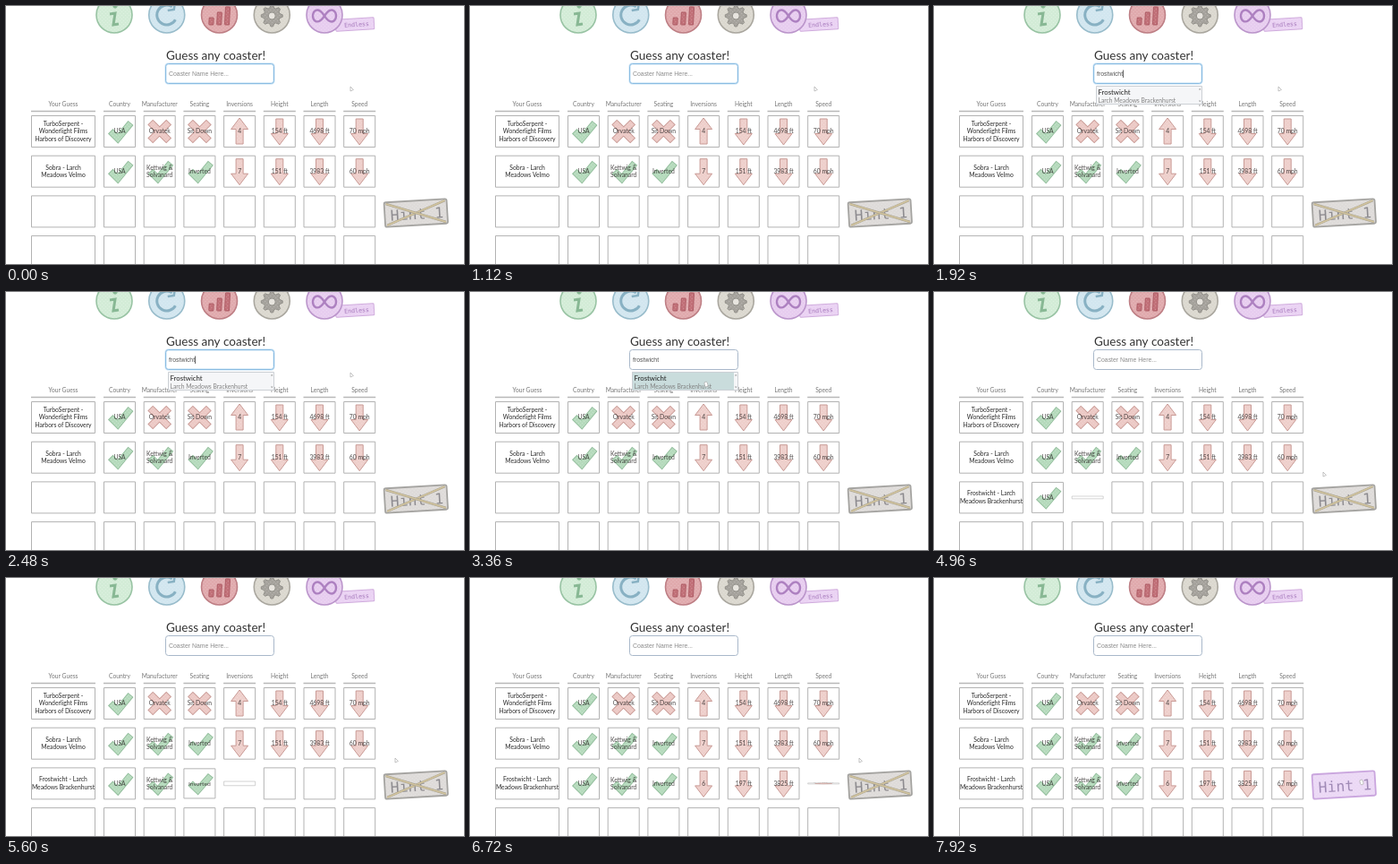
Recreate the animation shown at these times as an HTML page with a canvas. Size 512 px wide and 288 px high, loop 8000 ms.

```html
<!DOCTYPE html>
<html lang="en">
<head>
<meta charset="utf-8">
<title>Coaster guessing game</title>
<style>
html, body { margin: 0; width: 512px; height: 288px; overflow: hidden; background: #fff; }
canvas { display: block; }
</style>
</head>
<body>
<canvas id="stage" width="512" height="288"></canvas>
<script>
const g = document.getElementById('stage').getContext('2d');
const LOOP = 8000, PITCH = 44.7, CELL = 36;
const SANS = 'Lato, "Open Sans", sans-serif';
const ARIAL = '"Liberation Sans", Arial, sans-serif';
const HAND = '"DejaVu Sans Mono", monospace';
const HEADS = ['Your Guess', 'Country', 'Manufacturer', 'Seating', 'Inversions', 'Height', 'Length', 'Speed'];
const ROWS = [
  { text: ['TurboSerpent -|Wonderlight Films|Harbors of Discovery', 'USA', 'Orvatek', 'Sit Down', '4', '154 ft', '4698 ft', '70 mph'], marks: ' vxxuddd' },
  { text: ['Sobra - Larch|Meadows Velmo', 'USA', 'Kettwig &|Solvanard', 'Inverted', '7', '151 ft', '3983 ft', '60 mph'], marks: ' vvvdddd' },
  { text: ['Frostwicht - Larch|Meadows Brackenhurst', 'USA', 'Kettwig &|Solvanard', 'Inverted', '6', '197 ft', '3825 ft', '67 mph'], marks: ' vvvdddd' }
];
const QUERY = 'frostwicht';
const TYPE_AT = 1360, TYPE_STEP = 55, HOVER = 2900, PRESS = 3280, PICK = 3500;
const FLIP_MID = 4386, FLIP_GAP = 333, FLIP_HALF = 400, HINT_AT = 7200;

// Light speckle laid over the hand-drawn shapes
const tile = document.createElement('canvas');
tile.width = tile.height = 4;
const tg = tile.getContext('2d');
tg.fillStyle = 'rgba(255,255,255,.25)';
tg.fillRect(0, 0, 1, 1);
tg.fillRect(2, 2, 1, 1);
const speckle = g.createPattern(tile, 'repeat');

const clamp = v => Math.max(0, Math.min(1, v));
const easeOut = p => 1 - (1 - p) ** 2;
const glide = (t, from, to) => {
  const u = clamp((t - from) / (to - from));
  return u * u * (3 - 2 * u);
};

function at(x, y, turn, body) {
  g.save();
  g.translate(x, y);
  g.rotate(turn);
  body();
  g.restore();
}

function text(str, x, y, size, color, align = 'left', family = SANS) {
  g.font = `${size}px ${family}`;
  g.fillStyle = color;
  g.textAlign = align;
  g.fillText(str, x, y);
}

function trace(...pts) {
  const p = new Path2D();
  pts.forEach(q => p.lineTo(...q));
  return p;
}

function disc(x, y, r, from = 0, to = 7) {
  const p = new Path2D();
  p.arc(x, y, r, from, to);
  return p;
}

function box(w, h, r = 0) {
  const p = new Path2D();
  p.roundRect(-w / 2, -h / 2, w, h, r);
  return p;
}

function line(path, color, width) {
  g.strokeStyle = color;
  g.lineWidth = width;
  g.stroke(path);
}

function paint(path, fill, edge, width = 1) {
  for (const style of [fill, speckle]) {
    g.fillStyle = style;
    g.fill(path);
  }
  line(path, edge, width);
}

// Thick outlined pen stroke
function marker(path, width, fill, edge) {
  g.lineCap = 'square';
  line(path, edge, width + 1.8);
  line(path, fill, width);
  line(path, speckle, width);
  g.lineCap = 'butt';
}

const CHECK = trace([-7.5, 2.5], [-2, 8], [10, -6.5]);
const CROSS = trace([-7.5, -7.5], [7.5, 7.5]);
CROSS.addPath(trace([-7.5, 7.5], [7.5, -7.5]));
const half = [[4, -14], [4, 2.5], [9.5, 2.5], [0, 15]];
const ARROW = trace(...half, ...half.map(([x, y]) => [-x, y]).reverse());
ARROW.closePath();

function drawMark(kind) {
  if (kind === 'v') marker(CHECK, 6, '#b5dabc', '#92bd9c');
  if (kind === 'x') marker(CROSS, 6.5, '#ecc9c5', '#c99a95');
  if (kind === 'd') paint(ARROW, '#eecfcb', '#c99a95');
  if (kind === 'u') at(0, 0, Math.PI, () => paint(ARROW, '#eecfcb', '#c99a95'));
}

const column = i => i ? { x: 109 + PITCH * (i - 1), w: CELL } : { x: 28, w: 72 };

function drawCell(row, i, t) {
  const { x, w } = column(i);
  let filled = row < 2, scale = 1;
  if (row === 2) {
    const phase = (t - FLIP_MID - FLIP_GAP * i) / FLIP_HALF;
    filled = phase >= 0;
    const turn = easeOut(clamp(filled ? phase : phase + 1)) * Math.PI / 2;
    scale = Math.max(.01, filled ? Math.sin(turn) : Math.cos(turn));
  }
  at(x + w / 2, 140 + PITCH * row, 0, () => {
    g.scale(1, scale);
    line(box(w - 1, CELL - 1), '#b2b2b2', 1);
    if (!filled) return;
    drawMark(ROWS[row].marks[i]);
    const lines = ROWS[row].text[i].split('|'), gap = i ? 8 : 8.7;
    lines.forEach((s, n) => text(s, 0, 2.4 + gap * (n - (lines.length - 1) / 2), 6.8,
      i ? 'rgba(35,30,30,.8)' : '#2a2a2a', 'center'));
  });
}

const GLYPHS = [
  c => {
    paint(disc(1, -10, 2.2), c, c);
    line(trace([-5, -1], [1, -2], [-1, 11], [5, 10]), c, 3);
  },
  c => {
    line(disc(0, 0, 11, .5, 5.3), c, 3);
    line(trace([1, -5], [8, -6], [9, -13]), c, 2.5);
  },
  c => {
    for (let k = 0; k < 3; k++) {
      const h = 8 + 6 * k;
      at(9 * k - 9, 11 - h / 2, .05, () => paint(box(5, h, 1), '#c27078', c));
    }
  },
  c => {
    const gear = new Path2D();
    for (let k = 0; k < 32; k++) {
      const a = (k - .5) * Math.PI / 16, r = k % 4 < 2 ? 12 : 9;
      gear.lineTo(r * Math.cos(a), 1 + r * Math.sin(a));
    }
    gear.closePath();
    paint(gear, '#a5a29c', c);
    paint(disc(0, 1, 4), '#e7e4de', c);
  },
  c => {
    const loop = new Path2D();
    for (let a = 0; a < 6.4; a += .1) {
      const k = 13 / (1 + Math.sin(a) ** 2);
      loop.lineTo(k * Math.cos(a), 1 + 1.4 * k * Math.sin(a) * Math.cos(a));
    }
    line(loop, c, 2.4);
  }
];
// Fill, rim and glyph colour of each badge
const BADGES = ['#d3ecd7 #98c3a3 #88b894', '#d2e6ef #98bccb #88b1c3', '#e0aaad #be7f85 #ad5c65',
  '#dbd8cf #aaa79f #918f89', '#e7cdef #bb95cb #ad80c0'];

function drawBadges() {
  at(390, 20.5, -.06, () => {
    paint(box(43, 13, 1), '#ead2f3', '#d0acdd');
    text('Endless', 2, 2.5, 6.6, '#a477ba', 'center', HAND);
  });
  BADGES.forEach((colors, i) => at(121 + 58.75 * i, 10, 0, () => {
    const [fill, rim, ink] = colors.split(' ');
    paint(disc(0, 0, 20), fill, rim, 1.6);
    GLYPHS[i](ink);
  }));
}

function drawInput(t) {
  const focused = t < PRESS;
  const count = t < PICK ? Math.max(0, Math.floor((t - TYPE_AT) / TYPE_STEP) + 1) : 0;
  const typed = QUERY.slice(0, count);
  at(239, 75.5, 0, () => {
    if (focused) line(box(121, 22, 3), '#d6eaf8', 2.4);
    line(box(121, 22, 3), focused ? '#8abce2' : '#a9b8ca', 1);
  });
  text(typed || 'Coaster Name Here...', 182, 78, 6.9, typed ? '#555' : '#8c8c8c', 'left', ARIAL);
  if (typed && focused && (t < 2400 || t % 1060 < 530)) {
    const x = 182.5 + g.measureText(typed).width;
    line(trace([x, 71.5], [x, 80]), '#333', .8);
  }
  if (typed.length > 1) drawList(t > HOVER);
}

function drawList(hover) {
  g.fillStyle = '#f5f6f8';
  g.fillRect(181, 89, 119, 21);
  if (hover) {
    g.fillStyle = '#c9dcdc';
    g.fillRect(181, 89, 114, 20.5);
  }
  at(240.5, 99.5, 0, () => line(box(118, 20), '#ccd0d5', 1));
  text('Frostwicht', 183.5, 98.5, 7.8, '#222');
  text('Larch Meadows Brackenhurst', 183.5, 107.6, 6.7, '#808080');
  g.fillStyle = '#999';
  for (const dir of [-1, 1]) {
    const y = 99.5 + 6 * dir;
    g.fill(trace([296, y], [298.4, y], [297.2, y + 1.7 * dir]));
  }
}

function drawHint(active) {
  at(458.3, 231, -.06, () => {
    paint(box(70, 27.5, 2), active ? '#ebd8f5' : '#dedbd9', active ? '#caa6de' : '#a5a4a1', 1.8);
    text('Hint 1', 1, 7, 16.5, active ? '#a08ab6' : '#8d8b8f', 'center', HAND);
    if (active) return;
    for (const dir of [-1, 1]) {
      const stroke = trace([-33, -12 * dir], [33, 12 * dir]);
      line(stroke, '#a39d8c', 2.4);
      line(stroke, '#d2c49e', 1.5);
    }
  });
}

function drawPointer(t) {
  const list = glide(t, 2500, 3100), away = glide(t, 3560, 4160), hint = glide(t, 7400, 7720);
  const x = 385 - 121 * list + 171 * away + 43 * hint;
  const y = 92 + 11 * list + 100 * away + 25 * hint;
  const hand = (t > HOVER && t < 3600) || t > 7600;
  const shape = hand ? box(3.4, 5.5, 1.5) : trace([0, -2], [0, 3], [3.4, 1.5], [0, -2]);
  at(x, y, hand ? -.3 : 0, () => {
    g.fillStyle = '#fff';
    g.fill(shape);
    line(shape, '#aaa', .7);
  });
}

function draw(t) {
  g.fillStyle = '#fff';
  g.fillRect(0, 0, 512, 288);
  drawBadges();
  text('Guess any coaster!', 179, 59.5, 13.5, '#333');
  HEADS.forEach((head, i) => {
    const { x, w } = column(i);
    text(head, x + w / 2, 112.3, 6.7, '#777', 'center');
    line(trace([x, 117.5], [x + w, 117.5]), '#b8b8b8', 1.4);
    for (let row = 0; row < 4; row++) drawCell(row, i, t);
  });
  drawInput(t);
  drawHint(t >= HINT_AT);
  drawPointer(t);
}

const start = performance.now();
function frame() {
  draw((performance.now() - start) % LOOP);
  requestAnimationFrame(frame);
}
frame();
</script>
</body>
</html>
```
